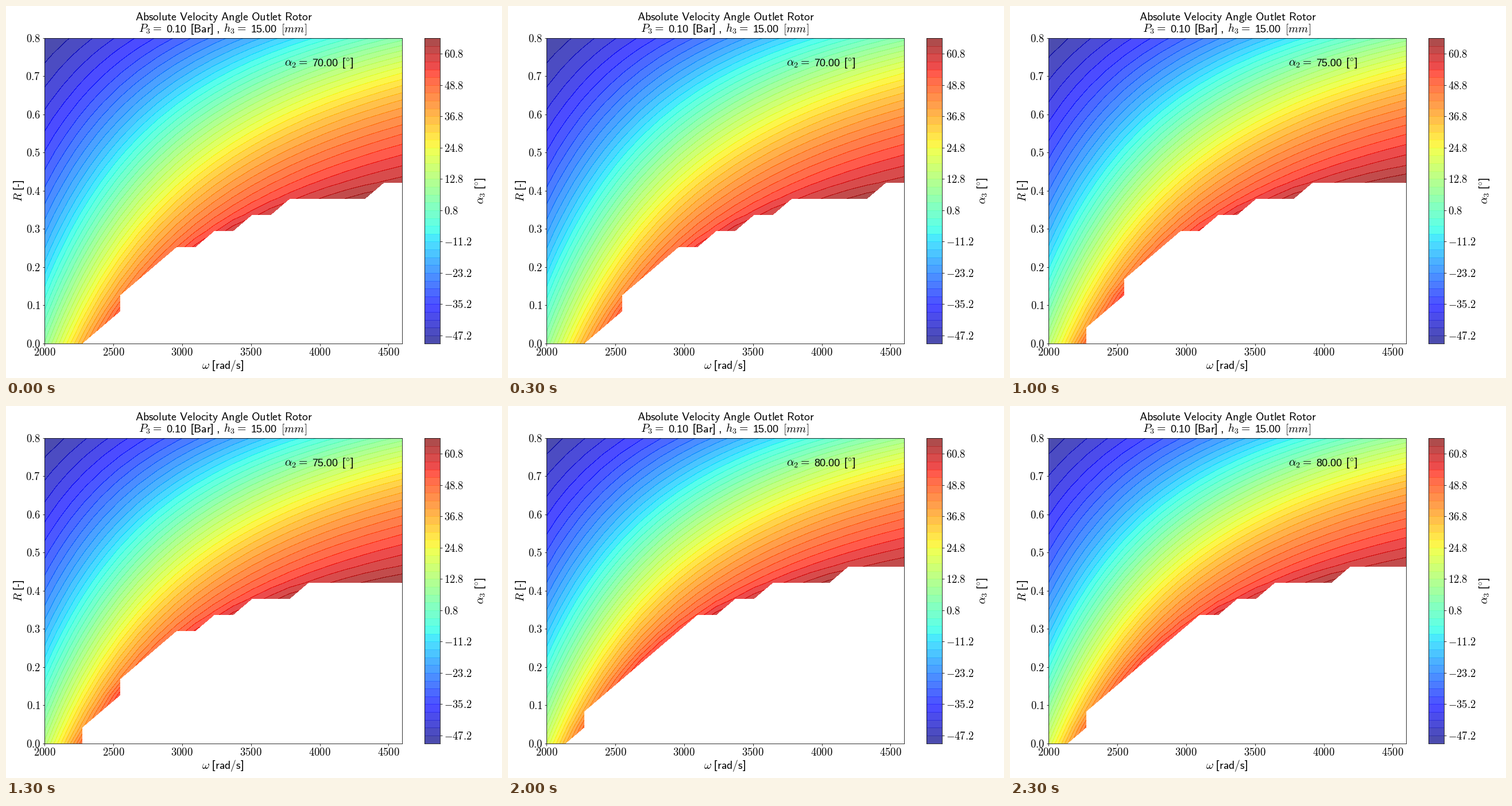
Write a matplotlib script that moves like this. It is 864 by 648 pixels and loops after 2500 ms.

```python
import numpy as np
import matplotlib.pyplot as plt
from matplotlib.animation import FuncAnimation

W, H, DPI = 864, 648, 72
SIZE, NUMBER_SIZE, TICK_SIZE = 19.8, 18, 18.7
TOP, BOTTOM = 56, 587.6

plt.rcParams.update({
    "font.family": "Liberation Sans",
    "mathtext.fontset": "cm",
    "font.size": SIZE,
})

LEVELS = -50.2 + 3.0 * np.arange(40)
MIDS = (LEVELS[:-1] + LEVELS[1:]) / 2
STYLE = dict(cmap="jet", vmin=LEVELS[0], vmax=LEVELS[-1], alpha=0.7)
LINE = 0.5

OMEGA = np.linspace(2000, 4600, 20)
REACTION = np.linspace(0, 0.8, 20)
INLET_ANGLES = np.linspace(70, 80, 5)

# Normalised stage constants: enthalpy drop, blade speed, flow speed
DROP, BLADE, FLOW = 1.81724, 0.29807, 2.0582

DEGREES = r"[$^{\circ}$]"


def outlet_angle(alpha2):
    """Absolute outlet angle in degrees, masked where no real solution exists."""
    x, r = np.meshgrid(OMEGA / OMEGA[0], REACTION)
    swirl = np.sqrt(1 - r) * np.sin(np.radians(alpha2))
    rel_sq = DROP + BLADE * x**2 - 2 * x * swirl
    rel = np.sqrt(np.maximum(rel_sq, 0))
    angle = np.degrees(np.arctan(FLOW * (np.sqrt(BLADE) * x - rel)))
    return np.ma.masked_where(rel_sq < 0, angle)


def pixel_axes(left, right):
    return fig.add_axes([left / W, 1 - BOTTOM / H,
                         (right - left) / W, (BOTTOM - TOP) / H])


def label(x, y, s, ha="center", rotation=0, size=SIZE):
    return fig.text(x / W, 1 - y / H, s, ha=ha, va="baseline", size=size,
                    rotation=rotation, rotation_mode="anchor")


def equation(x, y, symbol, value, unit):
    """Symbol, equals sign, sans-serif number and unit on one baseline."""
    number = f"{value:.2f}"
    number_x = x + 48
    unit_x = number_x + 6.5 + NUMBER_SIZE * (0.556 * len(number) - 0.278)
    return [label(x, y, f"${symbol}=$", "left"),
            label(number_x, y, number, "left", size=NUMBER_SIZE),
            label(unit_x, y, unit, "left")]


def sans(s):
    return r"$\mathsf{" + s.replace(" ", r"\ ") + "}$"


def roman(value, fmt):
    sign = "-" if value < 0 else ""
    return "$" + sign + r"\mathrm{" + format(abs(value), fmt) + "}$"


def set_ticks(axis, values, fmt):
    axis.set_ticks(values, [roman(v, fmt) for v in values])
    axis.set_tick_params(labelsize=TICK_SIZE)


def build_scene(alpha2):
    angle = outlet_angle(alpha2)
    fill = ax.contourf(OMEGA, REACTION, angle, LEVELS, **STYLE)
    lines = ax.contour(OMEGA, REACTION, angle, LEVELS, linewidths=LINE, **STYLE)
    return [fill, lines, *equation(485, 105, r"\alpha_2", alpha2, DEGREES)]


def update(frame):
    for i, scene in enumerate(scenes):
        for artist in scene:
            artist.set_visible(i == frame)
    return scenes[frame]


fig = plt.figure(figsize=(W / DPI, H / DPI), dpi=DPI, facecolor="white")

ax = pixel_axes(67, 690.4)
scenes = [build_scene(a) for a in INLET_ANGLES]
ax.set(xlim=(2000, 4600), ylim=(0, 0.8))
set_ticks(ax.xaxis, np.arange(2000, 4501, 500), ".0f")
set_ticks(ax.yaxis, np.arange(9) / 10, ".1f")

bar = pixel_axes(729.4, 756)
bar.pcolormesh([0, 1], LEVELS, MIDS[:, None], **STYLE)
bar.hlines(LEVELS[1:-1], 0, 1, linewidths=LINE, alpha=0.7,
           colors=plt.get_cmap("jet")(np.linspace(0, 1, len(LEVELS))[1:-1]))
bar.set(xlim=(0, 1), ylim=(LEVELS[0], LEVELS[-1]), xticks=[])
bar.yaxis.tick_right()
set_ticks(bar.yaxis, LEVELS[1::4], ".1f")

label(379.5, 25, sans("Absolute Velocity Angle Outlet Rotor"))
equation(231, 46, "P_3", 0.10, r"[$\mathsf{Bar}$] ,")
equation(379, 46, "h_3", 15.00, "$[mm]$")
label(378, 632, r"$\omega$ [$\mathsf{rad}/\mathsf{s}$]")
label(28, 322, "$R$ [-]", rotation=90)
label(832, 322, rf"$\alpha_3$ {DEGREES}", rotation=90)

update(0)
anim = FuncAnimation(fig, update, frames=len(scenes), interval=500,
                     repeat=True, repeat_delay=0, blit=False)
plt.show()
```
